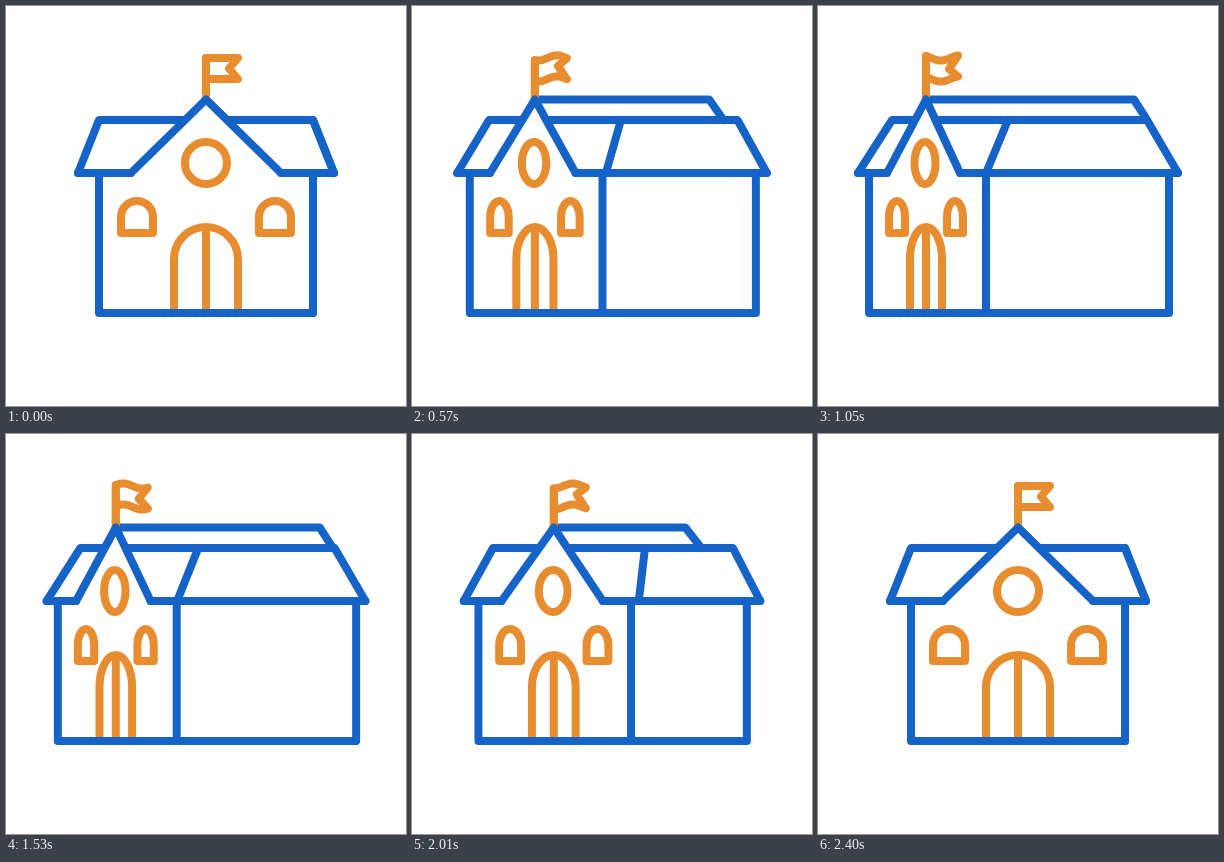
These frames come from a looping animation (400 px wide and 400 px high, 3460 ms). An HTML page with a canvas:

```html
<!DOCTYPE html>
<html lang="en">
<head>
<meta charset="utf-8">
<title>Turning schoolhouse</title>
<style>
  html, body { margin: 0; width: 100%; height: 100%; overflow: hidden; background: #fff; }
  canvas { display: block; width: 100%; height: 100%; }
</style>
</head>
<body>
<canvas id="stage" width="400" height="400"></canvas>
<script>
const ctx = document.getElementById('stage').getContext('2d');
const BLUE = '#1663c7', ORANGE = '#e88c30';
const LOOP = 3460, MOVE = 2400, TURN = 1060;

const clamp = v => Math.max(0, Math.min(1, v));

// cubic-bezier(.25, .1, .25, 1)
function ease(x) {
  const curve = (a, b, u) => 3 * a * u * (1 - u) ** 2 + 3 * b * u * u * (1 - u) + u ** 3;
  let lo = 0, hi = 1;
  for (let i = 0; i < 24; i++) {
    const mid = (lo + hi) / 2;
    if (curve(.25, .25, mid) < x) lo = mid; else hi = mid;
  }
  return curve(.1, 1, lo);
}

function line(...points) {
  ctx.beginPath();
  points.forEach(([x, y]) => ctx.lineTo(x, y));
  ctx.stroke();
}

function arch(x, half, spring, rise, bottom, closed) {
  ctx.beginPath();
  ctx.moveTo(x - half, bottom);
  ctx.lineTo(x - half, spring);
  ctx.ellipse(x, spring, half, rise, 0, Math.PI, 2 * Math.PI);
  ctx.lineTo(x + half, bottom);
  if (closed) ctx.closePath();
  ctx.stroke();
}

function drawFlag(x, t) {
  const amp = 2.6 * Math.min(clamp(t / 300), clamp((MOVE - t) / 400));
  const crest = 22 + Math.max(0, t - 570) * .0243;
  const at = (dx, y) => [x + dx, y - amp * Math.cos((dx - crest) * 2 * Math.PI / 38)];
  const edge = y => Array.from({ length: 17 }, (_, i) => at(i * 2, y + .0));
  line([x, 93], ...edge(52), at(23, 62.5), ...edge(73).reverse());
  line([x, 93], at(0, 52));
}

function draw(t) {
  const p = ease(clamp(Math.min(t, MOVE - t) / TURN));
  const mix = (a, b) => a + (b - a) * p;
  const apex = [mix(200, 108), 93.5];
  const gableL = [mix(125, 69), 167], gableR = [mix(275, 142), 167];
  const eaveL = [mix(72, 40), 167], eaveR = [mix(328, 360), 167];
  const topL = [mix(93, 74), 114], topR = [mix(307, 329), 114];
  const wallL = mix(93, 51), corner = mix(307, 168), wallR = mix(307, 351);

  ctx.fillStyle = '#fff';
  ctx.fillRect(0, 0, 400, 400);
  ctx.lineWidth = 8;
  ctx.lineCap = ctx.lineJoin = 'round';

  // Roof behind the gable
  ctx.strokeStyle = BLUE;
  line(apex, [mix(200, 316), 93.5], [mix(221, 329), 114]);
  line(gableL, eaveL, topL, topR, eaveR, gableR);
  line([mix(307, 190), 114], [mix(328, 168), 167]);
  ctx.beginPath();
  [gableL, apex, gableR].forEach(([x, y]) => ctx.lineTo(x, y));
  ctx.fill();

  ctx.strokeStyle = ORANGE;
  drawFlag(apex[0], t);
  ctx.beginPath();
  ctx.ellipse(mix(200, 107), 157, mix(21, 10.5), 21, 0, 0, 2 * Math.PI);
  ctx.stroke();
  for (const x of [mix(131, 79), mix(269, 137)]) arch(x, mix(16, 8), 211, 16, 227, true);
  ctx.lineCap = 'butt';
  arch(apex[0], mix(32, 16), 253, 32, 304, false);
  line([apex[0], 222], [apex[0], 304]);

  // Gable and walls
  ctx.lineCap = 'round';
  ctx.strokeStyle = BLUE;
  line(eaveL, gableL, apex, gableR, eaveR);
  line([wallL, 167], [wallL, 307], [wallR, 307], [wallR, 167]);
  line([corner, 167], [corner, 307]);
}

const start = performance.now();
function tick() {
  draw((performance.now() - start) % LOOP);
  requestAnimationFrame(tick);
}
tick();
</script>
</body>
</html>
```
